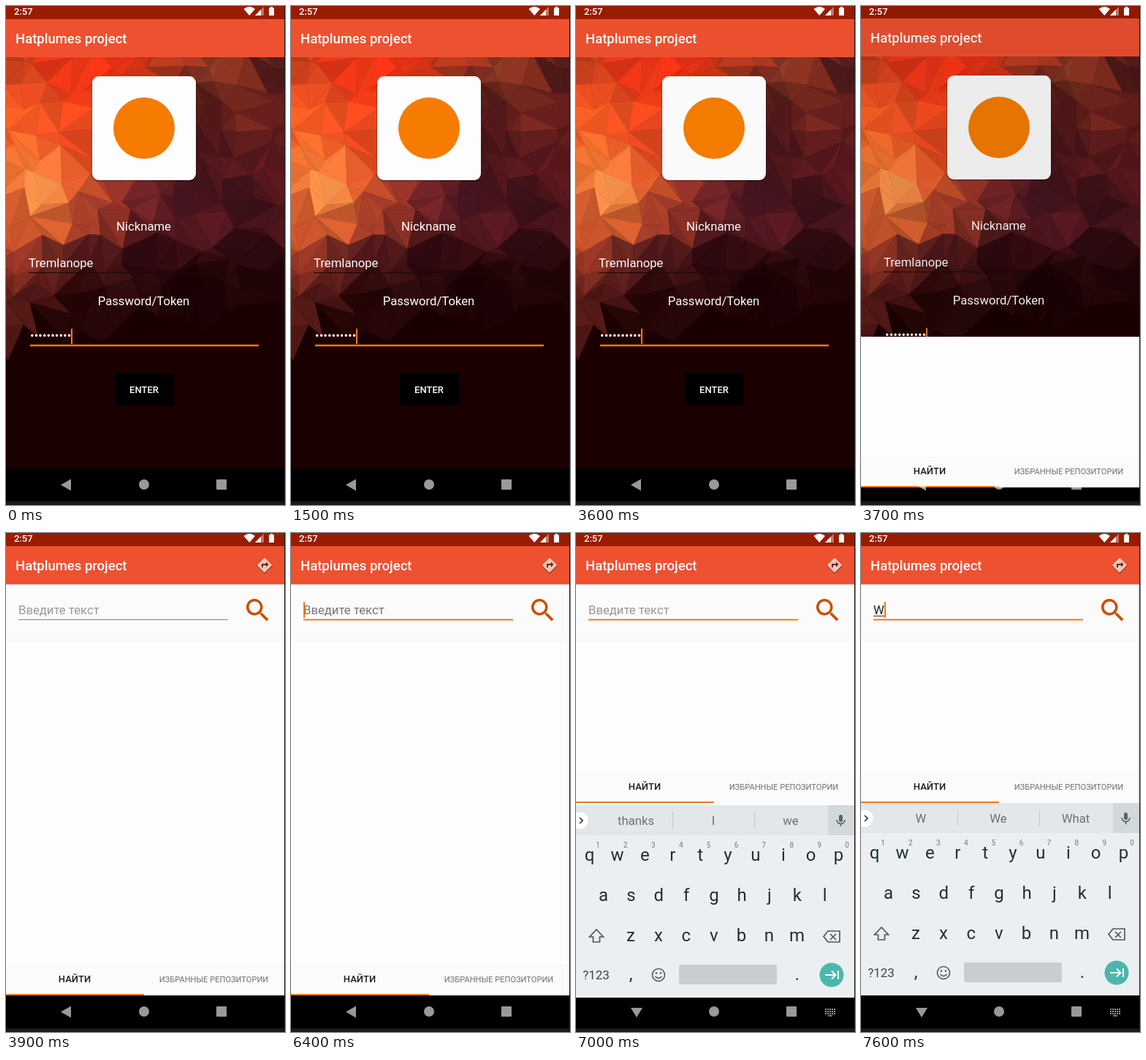
Write an HTML page that moves like this. It is 382 px wide and 682 px high and loops after 8 s.

```html
<!DOCTYPE html>
<html lang="ru">
<head>
<meta charset="utf-8">
<title>Login and search</title>
<style>
html, body { margin: 0; width: 100%; height: 100%; overflow: hidden; background: #1a1a1a; }
svg { display: block; font-family: Roboto, "Noto Sans", sans-serif; }
.m { font-weight: 500; }
.c { text-anchor: middle; }
</style>
</head>
<body>
<svg id="stage" width="382" height="682" viewBox="0 0 382 682"></svg>
<script>
const ORANGE = '#f5761f', INK = '#1f3036', BODY = 16.7;
const rect = (x, y, w, h, fill, more = '') =>
  `<rect x="${x}" y="${y}" width="${w}" height="${h}" fill="${fill}" ${more}/>`;
const circle = (x, y, r, fill, more = '') =>
  `<circle cx="${x}" cy="${y}" r="${r}" fill="${fill}" ${more}/>`;
const text = (x, y, s, size, fill, more = '') =>
  `<text x="${x}" y="${y}" font-size="${size}" fill="${fill}" ${more}>${s}</text>`;
const mid = (x, y, s, size, fill, more = '') => text(x, y, s, size, fill, 'text-anchor="middle" ' + more);
const path = (d, fill, more = '') => `<path d="${d}" fill="${fill}" ${more}/>`;
const line = (d, colour, width) => path(d, 'none', `stroke="${colour}" stroke-width="${width}"`);

// Low-poly wallpaper: jittered triangles tinted by nearby colour anchors
const anchors = [
  [5, 80, 'c8401c'], [35, 110, 'e04a20'], [75, 85, 'e63416'], [105, 120, 'f03c18'], [140, 80, 'ee3214'],
  [190, 80, 'd83416'], [235, 82, 'a83820'], [255, 110, '4c1a18'], [285, 90, '8a3a24'], [320, 85, '86301e'],
  [365, 85, '4e1a1a'], [285, 145, '4c1618'], [320, 150, '7c2a20'], [365, 150, '601c1c'], [280, 200, '4a161a'],
  [325, 210, '5c1a1e'], [370, 225, '601a1e'], [15, 160, 'fa5c22'], [65, 160, 'f85624'], [105, 190, 'ee4a20'],
  [25, 215, 'ff7c36'], [50, 255, 'ff9a50'], [100, 245, 'ee6430'], [12, 300, 'd2582c'], [60, 300, 'd6602e'],
  [105, 295, 'a83e2a'], [145, 265, '98342a'], [195, 265, '702428'], [245, 270, '441420'], [275, 300, '5c1a22'],
  [320, 270, '3a1018'], [368, 290, '48141c'], [325, 330, '2c0a10'], [20, 350, '8e3424'], [65, 345, '6a2422'],
  [115, 340, '461418'], [10, 415, '5a1c18'], [45, 400, '481414'], [100, 400, '220406'], [190, 345, '2a080e'],
  [260, 380, '1c0204'], [360, 370, '200406'], [60, 455, '1a0000'], [200, 450, '1a0000'], [350, 450, '1a0000']
].map(([x, y, hex]) => ({ x, y, rgb: [0, 2, 4].map(i => parseInt(hex.substr(i, 2), 16)) }));

let seed = 11;
const random = () => (seed = seed * 16807 % 2147483647) / 2147483647;

function tint(x, y) {
  const sum = [0, 0, 0];
  let total = 0;
  for (const a of anchors) {
    const w = 1 / (((x - a.x) ** 2 + (y - a.y) ** 2) ** 2 + 1e5);
    total += w;
    a.rgb.forEach((v, i) => sum[i] += v * w);
  }
  const shade = y > 440 ? 1 : 0.89 + random() * 0.22;
  return `rgb(${sum.map(v => Math.min(255, v / total * shade | 0))})`;
}

function wallpaper() {
  const cell = 31, cols = 14, rows = 14, grid = [];
  for (let r = 0; r <= rows; r++)
    for (let c = 0; c <= cols; c++)
      grid.push([(c - 0.95 + random() * 0.9) * cell, 60 + (r - 0.95 + random() * 0.9) * cell]);
  let out = rect(0, 70, 381, 562, '#1a0000');
  const facet = pts => {
    const [x, y] = [0, 1].map(i => (pts[0][i] + pts[1][i] + pts[2][i]) / 3);
    if (y > 455 - x * 0.1) return;
    const fill = tint(x, y);
    out += `<polygon points="${pts.map(p => p.map(v => v.toFixed(1))).join(' ')}" fill="${fill}" stroke="${fill}" stroke-width=".5"/>`;
  };
  for (let r = 0; r < rows; r++)
    for (let c = 0; c < cols; c++) {
      const i = r * (cols + 1) + c;
      const [a, b, d, e] = [grid[i], grid[i + 1], grid[i + cols + 1], grid[i + cols + 2]];
      const sides = random() < 0.5 ? [[a, b, d], [b, d, e]] : [[a, b, e], [a, d, e]];
      sides.forEach(facet);
    }
  return out;
}

const header = rect(0, 0, 381, 18, '#9a1c00') + rect(0, 18, 381, 52, '#ee5130') +
  text(13, 51, 'Hatplumes project', 18.5, '#fff', 'class="m"');

const login = wallpaper() + header +
  rect(117, 97, 144, 143, '#000', 'rx="10" opacity=".22"') + rect(118, 96, 142, 142, '#fdfdfd', 'rx="9"') +
  circle(189, 167, 42, '#f57c00') +
  mid(188.5, 307, 'Nickname', BODY, '#fff') + text(31, 357, 'Tremlanope', BODY, '#fff') +
  rect(31, 364, 315, 1, '#1c0808') + mid(188.5, 409, 'Password/Token', BODY, '#fff') +
  text(33, 456, '•'.repeat(10), BODY, '#fff') + rect(33, 462.7, 313, 2.5, ORANGE) +
  rect(89, 441, 2, 21, ORANGE, 'id="pwCaret"') +
  rect(149, 502, 81, 44, '#000', 'rx="2"') + mid(189, 529, 'ENTER', 13, '#fff', 'class="m"');

const tabs = rect(0, 590, 381, 2, '#fff6f2') + rect(0, 592, 381, 40, '#fbfbfb') +
  mid(94, 614, 'НАЙТИ', 13, '#1c1c1c', 'class="m"') +
  mid(284.5, 614, 'ИЗБРАННЫЕ РЕПОЗИТОРИИ', 11.1, '#707070') +
  rect(0, 630, 189, 2, ORANGE);

const search = rect(0, 70, 381, 562, '#fdfdfd') + header + rect(0, 70, 381, 1, '#000', 'opacity=".15"') +
  rect(0, 71, 381, 2, '#000', 'opacity=".04"') +
  rect(0, 74, 381, 73, '#fff4f0', 'rx="4"') + rect(0, 74, 381, 71, '#fbfbfb', 'rx="4"') +
  path('M346 37h16v15h-16z', '#6d2418', 'transform="rotate(45 354 44.5)"') +
  path('M21.7 11.3l-9-9q-.7-.6-1.4 0l-9 9q-.6.7 0 1.4l9 9q.7.6 1.4 0l9-9q.6-.7 0-1.4zM14 14.5V12h-4v3H8v-4q0-1 1-1h5V7.5l3.5 3.5z',
    '#efc3b5', 'transform="translate(342 32)"') +
  path('M15.5 14h-.8l-.3-.3A6.5 6.5 0 1 0 9.5 16c1.6 0 3.1-.6 4.2-1.6l.3.3v.8l5 5 1.5-1.5zm-6 0a4.5 4.5 0 1 1 0-9 4.5 4.5 0 0 1 0 9z',
    '#c94f00', 'transform="translate(323.8 84.8) scale(1.74)"') +
  text(17, 111, 'Введите текст', BODY, '#999', 'id="hint"') +
  `<g id="typed">${text(17, 111, 'W', BODY, '#222')}${rect(17, 113, 15, 1, '#333')}</g>` +
  rect(17, 118, 287, 1, '#858585', 'id="rule"') + rect(17, 117.5, 287, 2, ORANGE, 'id="ruleOn"') +
  rect(17, 94, 2, 22, ORANGE, 'id="caret"') + `<g id="tabs">${tabs}</g>`;

const keyRow = (keys, x, y) =>
  [...keys].map((k, i) => mid(x + i * 37.9, y, k, 24, INK)).join('');

const keyboard = rect(0, 369, 381, 263, '#eceff1') + rect(0, 369, 381, 41, '#e3e7e9') +
  rect(345, 369, 36, 41, '#d3d8da') + circle(5, 390, 11.5, '#fff') + line('M5 386l4 4-4 4', '#333', 1.7) +
  [82, 188, 294].map(x => mid(x, 396, '', BODY, '#697276', 'data-word=""')).join('') +
  rect(132, 378, 1, 23, '#c3c9cc') + rect(244, 378, 1, 23, '#c3c9cc') +
  rect(360, 382, 5, 10, '#596468', 'rx="2.5"') + line('M357 389a5.5 5.5 0 0 0 11 0M362.5 394v4', '#596468', 1.6) +
  keyRow('qwertyuiop', 18.5, 445) + keyRow('asdfghjkl', 37.5, 500) + keyRow('zxcvbnm', 75, 555) +
  [...'1234567890'].map((d, i) => mid(30 + i * 37.9, 427, d, 10, '#70797d')).join('') +
  line('M28 539l-9.5 10h5v7h9v-7h5z', '#4e5a5f', 1.7) +
  line('M345 541h16v15h-16l-6-7.5zM348 545l8 8M356 545l-8 8', '#4e5a5f', 1.7) +
  mid(27.5, 607, '?123', 17, '#37474f') + mid(75, 608, ',', 24, INK) + mid(303, 608, '.', 24, INK) +
  circle(113, 601, 8.5, 'none', 'stroke="#4e5a5f" stroke-width="1.6"') +
  circle(110, 598.5, 1.3, '#4e5a5f') + circle(116, 598.5, 1.3, '#4e5a5f') +
  line('M108.5 603q4.5 5 9 0', '#4e5a5f', 1.6) +
  rect(141, 587, 134, 27, '#c8cdd0', 'rx="3"') + circle(350, 601, 16.5, '#4db6ac') +
  line('M341 601h14M350 595.5l5.5 5.5-5.5 5.5M359 595v12', '#fff', 2);

const status = text(11, 12, '2:57', 13, '#fff', 'class="m"') +
  path('M325.5 4q8-6 15.5 0l-7.7 9z', '#fff') +
  path('M353 1v12h-12z', '#fff', 'opacity=".4"') + path('M349 5v8h-8z', '#fff') +
  path('M360 2.5h2V1h3v1.5h2V13h-7z', '#fff');

const dots = [0, 1, 2].map(r => [0, 1, 2, 3, 4].map(c => rect(341 + c * 3, 650 + r * 3, 2, 2, '#fff')).join('')).join('');
const nav = path('M89 646.5v16l-14-8z', '#fff', 'id="back"') +
  `<g id="down">${path('M75 649h16l-8 13z', '#fff')}${dots}${rect(345, 659, 6, 1.5, '#fff')}</g>` +
  circle(189, 654, 7, '#fff') + rect(288, 647, 14, 14, '#fff', 'rx="1"');

document.getElementById('stage').innerHTML = `
  <defs>
    <clipPath id="phone"><rect width="381" height="677"/></clipPath>
    <clipPath id="reveal"><rect id="window" width="381" height="677"/></clipPath>
  </defs>
  <g clip-path="url(#phone)">
    ${rect(0, 0, 381, 677, '#000')}
    <g id="login">${login}${rect(0, 0, 381, 632, '#000', 'id="dim"')}</g>
    <g clip-path="url(#reveal)" id="next"><g id="search">${search}</g></g>
    <g id="keyboard">${keyboard}</g>
    ${status}<g opacity=".6">${nav}</g>
  </g>`;

const el = id => document.getElementById(id);
const show = (id, on) => el(id).setAttribute('display', on ? 'inline' : 'none');
const shift = (id, y) => el(id).setAttribute('transform', `translate(0 ${y})`);
const words = document.querySelectorAll('[data-word]');
const blinks = [200, 600, 1100, 1500, 2000, 2500, 2900, 3400];

function draw(t) {
  const step = Math.floor(t / 100);

  // Login, then the next screen is revealed from the bottom
  const open = Math.min(3, step - 36), stage = Math.max(0, open);
  show('pwCaret', blinks.filter(b => t >= b).length % 2 === 0);
  show('login', open < 3);
  shift('login', open > 0 ? 1 - 2 * open : 0);
  el('dim').setAttribute('opacity', open < 0 ? 0 : 0.01 + open * 0.055);
  show('next', open > 0);
  el('window').setAttribute('y', [677, 452, 40, 0][stage]);
  shift('search', [26, 26, 10, 0][stage]);

  // Search field focus and typing
  const focus = t >= 6400, typed = t >= 7600;
  show('hint', !typed);
  el('hint').setAttribute('fill', focus && t < 6600 ? '#757575' : '#999');
  show('typed', typed);
  show('rule', !focus);
  show('ruleOn', focus);
  show('caret', focus && Math.floor((t - 6400) / 500) % 2 === 0);
  el('caret').setAttribute('x', typed ? 32 : 17);

  // Keyboard slides up while fading in
  const rise = Math.min(3, step - 68), keys = rise >= 0;
  show('keyboard', keys);
  show('down', keys);
  show('back', !keys);
  shift('keyboard', keys ? [65, 20, 3, 0][rise] : 0);
  el('keyboard').setAttribute('opacity', keys ? [0.45, 0.85, 1, 1][rise] : 0);
  shift('tabs', rise > 0 ? -263 : 0);
  const list = typed ? ['W', 'We', 'What'] : ['thanks', 'I', 'we'];
  words.forEach((w, i) => w.textContent = list[i]);
}

const start = performance.now();
function frame(now) {
  draw(Math.max(0, now - start) % 8000);
  requestAnimationFrame(frame);
}
draw(0);
requestAnimationFrame(frame);
</script>
</body>
</html>
```
